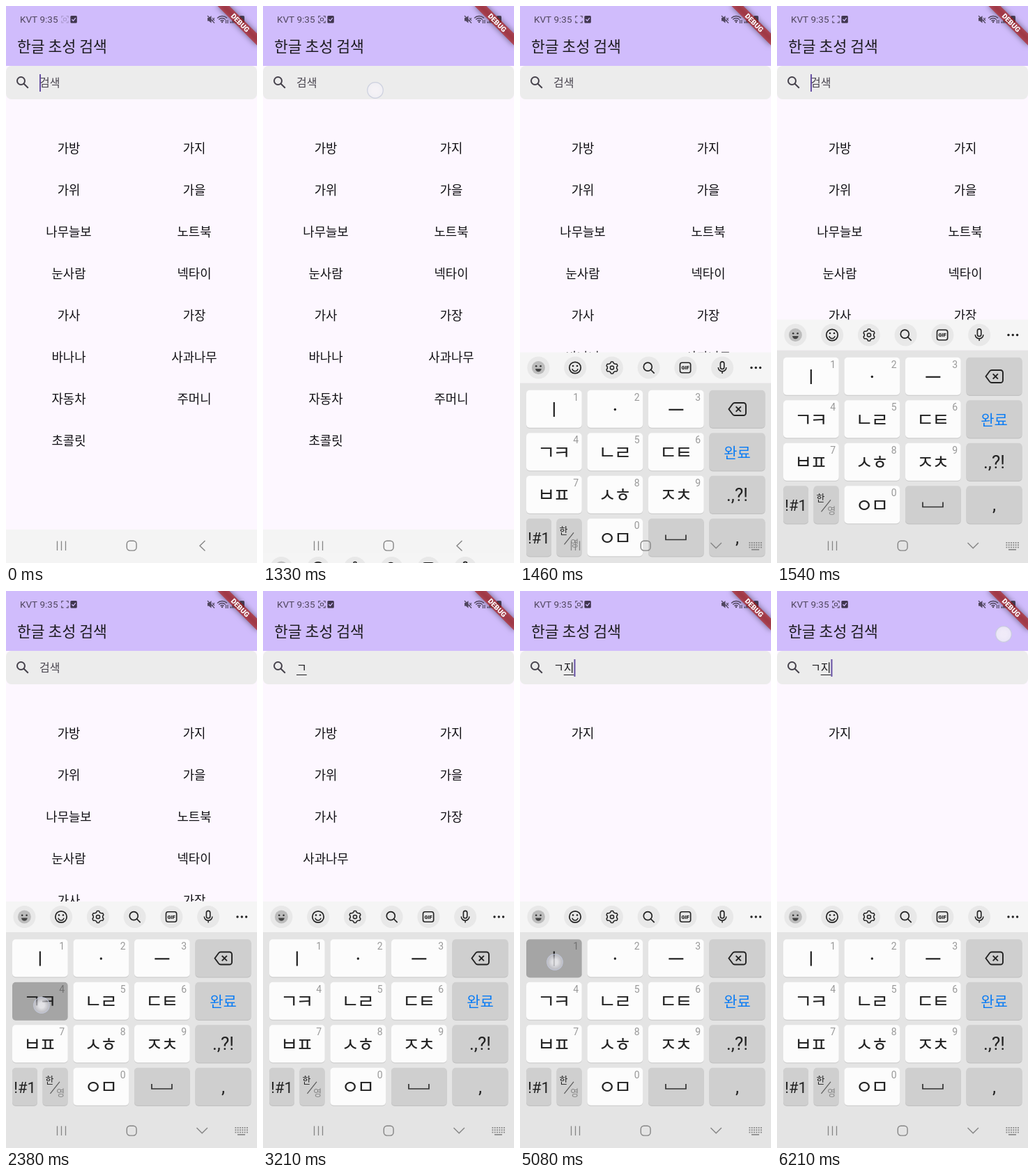
An HTML page with a canvas that plays this animation: 360 px wide and 800 px high, repeating every 6290 ms.

```html
<!DOCTYPE html>
<html lang="ko">
<head>
<meta charset="utf-8">
<title>한글 초성 검색</title>
<style>
html, body { margin: 0; width: 100%; height: 100%; overflow: hidden; background: #fdf7ff; }
canvas { display: block; width: 360px; height: 800px; }
</style>
</head>
<body>
<canvas id="stage"></canvas>
<script>
const LOOP = 6290;
const KR = '"Noto Sans CJK KR", "Noto Sans CJK", sans-serif';
const LATIN = 'Roboto, sans-serif';
const INK = '#1c1b1f', STATUS = '#50465f', NAV = '#858585';
const WORDS = '가방 가지 가위 가을 나무늘보 노트북 눈사람 넥타이 가사 가장 바나나 사과나무 자동차 주머니 초콜릿'.split(' ');
const INITIALS = 'ㄱㄲㄴㄷㄸㄹㅁㅂㅃㅅㅆㅇㅈㅉㅊㅋㅌㅍㅎ';
const FIELD_X = 48, FIELD_ADVANCE = 14.72;

// [start time, value] steps
const QUERY = [[0, ''], [2460, 'ㄱ'], [3830, 'ㄱㅈ'], [5080, 'ㄱ지']];
const DROP = [[0, 400], [1330, 339], [1380, 238], [1420, 125], [1460, 51.5], [1500, 18], [1540, 4.5], [1590, 1], [1630, 0]];
const CURSOR = [[0, 1], [540, 0], [1040, 1], [1250, 0], [1540, 1], [2040, 0], [2460, 1], [2960, 0],
  [3500, 1], [4330, 0], [4830, 1], [5580, 0], [6080, 1]];
const TAPS = [
  { from: 1210, hold: 1330, to: 1400, x: 161, y: 121 },
  { from: 2380, hold: 2500, to: 2630, x: 51, y: 595, key: 'ㄱㅋ' },
  { from: 3670, hold: 3830, to: 3960, x: 224, y: 657, key: 'ㅈㅊ' },
  { from: 4960, hold: 5080, to: 5210, x: 50, y: 533, key: 'ㅣ' },
  { from: 6210, hold: 6400, to: 6500, x: 325, y: 62 }
];

const canvas = document.getElementById('stage');
const ratio = window.devicePixelRatio || 1;
canvas.width = 360 * ratio;
canvas.height = 800 * ratio;
const c = canvas.getContext('2d');

const clamp = v => Math.max(0, Math.min(1, v));
const stepAt = (steps, t) => steps.filter(s => s[0] <= t).pop()[1];
const tapAlpha = (tap, t) => t < tap.from ? 0 : clamp((tap.to - t) / (tap.to - tap.hold));

function rect(x, y, w, h, color) {
  c.fillStyle = color;
  c.fillRect(x, y, w, h);
}
function box(x, y, w, h, r) {
  c.beginPath();
  c.roundRect(x, y, w, h, r);
}
function fillBox(x, y, w, h, r, color) {
  box(x, y, w, h, r);
  c.fillStyle = color;
  c.fill();
}
function disc(x, y, r, color) {
  c.beginPath();
  c.arc(x, y, r, 0, 7);
  c.fillStyle = color;
  c.fill();
}
function stroke(color, width) {
  c.strokeStyle = color;
  c.lineWidth = width;
  c.stroke();
}
function ring(x, y, r, color, width) {
  c.beginPath();
  c.arc(x, y, r, 0, 7);
  stroke(color, width);
}
function line(color, width, ...points) {
  c.beginPath();
  for (let i = 0; i < points.length; i += 2) c.lineTo(points[i], points[i + 1]);
  stroke(color, width);
}
function text(s, x, y, size, color, { font = KR, align = 'left', weight = 400, spacing = 0 } = {}) {
  c.font = `${weight} ${size}px ${font}`;
  c.letterSpacing = `${spacing}px`;
  c.textAlign = align;
  c.fillStyle = color;
  c.fillText(s, x, y);
}

function matches(word, query) {
  const fits = (a, b) => a === b || INITIALS[Math.floor((a.charCodeAt(0) - 0xac00) / 588)] === b;
  return [...word].some((_, i) => [...query].every((q, j) => word[i + j] && fits(word[i + j], q)));
}

function magnifier(x, y, r, reach, color, width) {
  ring(x, y, r, color, width);
  const d = r * 0.72;
  line(color, width, x + d, y + d, x + reach, y + reach);
}

function drawStatus(t) {
  text('KVT', 20, 24, 13.5, STATUS, { font: LATIN });
  text('9:35', 48.5, 24, 13.5, STATUS, { font: LATIN });

  c.globalAlpha = t < 210 ? 0.3 + 0.7 * t / 210 : 1;
  for (const sx of [-1, 1]) for (const sy of [-1, 1]) {
    const x = 84.5 + sx * 4.7, y = 19.2 + sy * 4.7;
    line(STATUS, 1.1, x - sx * 2.7, y, x, y, x, y - sy * 2.7);
  }
  if (Math.floor((t + 120) / 500) % 2 === 0) {
    box(82.5, 17.2, 4, 4, 1);
    stroke(STATUS, 1.1);
  }
  c.globalAlpha = 1;

  fillBox(92.4, 14, 9.4, 10.4, 1.5, '#40364f');
  line('#d0bcfc', 1.3, 94.5, 19.2, 96.5, 21.3, 99.8, 17.2);

  c.beginPath();
  [[289, 17], [291, 17], [294.5, 14], [294.5, 24.5], [291, 21.5], [289, 21.5]].forEach(p => c.lineTo(...p));
  c.fillStyle = STATUS;
  c.fill();
  line(STATUS, 1.2, 289, 14, 299, 24.5);
  line(STATUS, 1.1, 296, 17, 299, 21);
  line(STATUS, 1.1, 299, 17, 296, 21);
  for (const r of [3.5, 6.5, 9.5]) {
    c.beginPath();
    c.arc(310, 24, r, -Math.PI * 0.76, -Math.PI * 0.24);
    stroke(STATUS, 1.3);
  }
  disc(310, 23, 1.2, STATUS);
  line(STATUS, 1.2, 315.5, 20, 315.5, 25);
  line(STATUS, 1.2, 318, 20, 318, 25);
  [2, 4.5, 7, 10].forEach((h, i) => rect(321.5 + i * 3, 24.5 - h, 2, h, STATUS));
  fillBox(335, 14, 7, 11, 1.5, STATUS);
}

function drawBanner() {
  c.save();
  c.translate(360, 0);
  c.rotate(Math.PI / 4);
  c.save();
  c.shadowColor = 'rgba(0,0,0,.5)';
  c.shadowBlur = 8 * ratio;
  c.shadowOffsetX = 1000 * ratio;
  const away = 1000 / Math.SQRT2;
  rect(-40 - away, 28 + away, 80, 12, '#000');
  c.restore();
  rect(-40, 28, 80, 12, 'rgba(183,28,28,.63)');
  text('DEBUG', 0, 37.6, 10.2, '#fff', { font: LATIN, align: 'center', weight: 900 });
  c.restore();
}

function drawApp(t) {
  const query = stepAt(QUERY, t);
  rect(0, 0, 360, 800, '#fdf7ff');
  rect(0, 0, 360, 86, '#d0bcfc');
  drawStatus(t);
  text('한글 초성 검색', 16, 65.5, 21.6, INK);

  fillBox(0, 86, 360, 48, 8, '#ececec');
  magnifier(21.5, 107.5, 5.5, 10.3, '#45414b', 2);
  [...(query || '검색')].forEach((ch, i) =>
    text(ch, FIELD_X + i * FIELD_ADVANCE, 116, 16, query ? INK : '#49454f'));
  const end = FIELD_X + query.length * FIELD_ADVANCE;
  if (query) rect(end - FIELD_ADVANCE, 120, FIELD_ADVANCE, 1, INK);
  if (stepAt(CURSOR, t)) rect(end, 98, 2, 25, '#6750a4');

  WORDS.filter(w => !query || matches(w, query)).forEach((word, i) =>
    text(word, 90 + i % 2 * 180, 211 + Math.floor(i / 2) * 60, 17.8, '#111014', { align: 'center' }));
  rect(0, 752, 360, 48, '#f4f4f4');
}

function drawToolbar() {
  const y = 468, dark = '#222';
  rect(0, 446, 360, 44, '#f5f5f5');
  for (let i = 0; i < 6; i++) disc(26.4 + i * 52.75, y, 16, '#e8e8e8');

  disc(26.4, y, 9.5, '#bcbcbc');
  disc(23.2, y - 2.2, 1.3, '#333');
  disc(29.6, y - 2.2, 1.3, '#333');
  c.beginPath();
  c.arc(26.4, y + 1.4, 4.3, 0, Math.PI);
  c.fillStyle = '#444';
  c.fill();

  ring(79, y, 8.2, dark, 1.7);
  disc(76, y - 2.5, 1.3, dark);
  disc(82, y - 2.5, 1.3, dark);
  c.beginPath();
  c.arc(79, y + 0.8, 4.2, 0.2, Math.PI - 0.2);
  stroke(dark, 1.5);

  c.beginPath();
  for (let i = 0; i < 64; i++) {
    const a = i / 64 * Math.PI * 2, r = 7.6 + 0.9 * Math.tanh(3 * Math.cos(6 * a + Math.PI));
    c.lineTo(132 + r * Math.cos(a), y + r * Math.sin(a));
  }
  c.closePath();
  stroke(dark, 1.5);
  ring(132, y, 2.6, dark, 1.5);

  magnifier(183.3, y - 1.3, 6, 9.4, dark, 1.7);

  box(229.5, y - 7.3, 15.2, 14.6, 3);
  stroke(dark, 1.6);
  text('GIF', 237.1, y + 2.6, 7.3, dark, { font: LATIN, align: 'center', weight: 900 });

  box(287.4, y - 8.6, 5.4, 10.6, 2.7);
  stroke(dark, 1.6);
  c.beginPath();
  c.arc(290.1, y - 0.5, 5.8, 0, Math.PI);
  stroke(dark, 1.5);
  line(dark, 1.5, 290.1, y + 5.3, 290.1, y + 8.6);

  for (const x of [332, 338.3, 344.6]) disc(x, y, 1.7, dark);
}

function drawKey(label, x, y, w, { digit, gray, press = 0 } = {}) {
  const cx = x + w / 2, cy = y + 27.2;
  fillBox(x, y + 1, w, 54.2, 5, gray ? '#c2c2c2' : '#cfcfcf');
  fillBox(x, y, w, 54, 5, gray ? '#cfcfcf' : '#fcfcfc');
  if (press) {
    c.globalAlpha = press;
    fillBox(x, y, w, 55, 5, '#a5a5a5');
    c.globalAlpha = 1;
  }
  if (digit) text(digit, x + w - 4.5, y + 15, 14, press ? '#707070' : '#999', { font: LATIN, align: 'right' });
  const latin = size => text(label, cx, y + 36, size, '#222', { font: LATIN, align: 'center' });
  switch (label) {
    case 'ㅣ': return rect(cx - 1.1, cy - 10, 2.2, 21, '#222');
    case 'ㆍ': return disc(cx, cy + 0.5, 1.7, '#222');
    case 'ㅡ': return rect(cx - 10.5, cy - 0.3, 21, 2.2, '#222');
    case '완료': return text(label, cx, cy + 8, 21, '#0b7cf4', { align: 'center' });
    case '!#1': return latin(22);
    case '.,?!': return latin(26);
    case ',': return latin(26);
    case 'space': return line('#333', 1.7, 209, cy - 4, 209, cy + 3, 238, cy + 3, 238, cy - 4);
    case 'lang':
      text('한', 62.5, y + 22, 13, '#222', { align: 'center' });
      text('영', 78.3, y + 40, 13, '#858585', { align: 'center' });
      return line('#555', 1.1, 63.5, y + 37, 77, y + 20);
    case 'erase':
      c.beginPath();
      c.moveTo(299.5, cy);
      c.lineTo(305, cy - 7.5);
      c.quadraticCurveTo(306.2, cy - 9, 308, cy - 9);
      c.arcTo(324, cy - 9, 324, cy, 3.5);
      c.arcTo(324, cy + 9, 308, cy + 9, 3.5);
      c.lineTo(308, cy + 9);
      c.quadraticCurveTo(306.2, cy + 9, 305, cy + 7.5);
      c.closePath();
      stroke('#222', 1.9);
      line('#222', 1.9, 309.7, cy - 3.6, 316.9, cy + 3.6);
      return line('#222', 1.9, 316.9, cy - 3.6, 309.7, cy + 3.6);
    default: text(label, cx - 1.5, cy + 10.3, 27.5, '#222', { align: 'center', weight: 500, spacing: -3 });
  }
}

function drawKeyboard(t) {
  const drop = stepAt(DROP, t);
  if (drop > 354) return;
  c.save();
  c.translate(0, drop);
  drawToolbar();
  rect(0, 490, 360, 310, '#e4e4e4');
  const press = label => {
    const tap = TAPS.find(p => p.key === label);
    return tap ? tapAlpha(tap, t) : 0;
  };
  const colX = i => 9 + i * 87.5, rowY = i => 500.3 + i * 61.5;
  ['ㅣ', 'ㆍ', 'ㅡ', 'ㄱㅋ', 'ㄴㄹ', 'ㄷㅌ', 'ㅂㅍ', 'ㅅㅎ', 'ㅈㅊ'].forEach((label, i) =>
    drawKey(label, colX(i % 3), rowY(Math.floor(i / 3)), 79.7, { digit: String(i + 1), press: press(label) }));
  ['erase', '완료', '.,?!', ','].forEach((label, i) => drawKey(label, colX(3), rowY(i), 80, { gray: true }));
  drawKey('!#1', 9, rowY(3), 36, { gray: true });
  drawKey('lang', 52.5, rowY(3), 36, { gray: true });
  drawKey('ㅇㅁ', colX(1), rowY(3), 79.7, { digit: '0' });
  drawKey('space', colX(2), rowY(3), 79.7, { gray: true });
  c.restore();
}

function drawNav(t) {
  for (const x of [73.5, 79.5, 85.5]) line(NAV, 1.3, x, 768.5, x, 782);
  box(173.3, 768.3, 13.8, 13.8, 4.5);
  stroke(NAV, 1.4);
  if (t < 1380) return line(NAV, 1.4, 285.5, 768, 278, 775.3, 285.5, 782.5);
  line(NAV, 1.4, 273.5, 771, 281.2, 778.7, 289, 771);
  for (let row = 0; row < 3; row++)
    for (let i = 0; i < 6; i++) rect(328.5 + i * 3.3, 770 + row * 3.3, 1.8, 1.8, NAV);
  rect(332, 780, 11, 1.6, NAV);
}

function drawTaps(t) {
  for (const tap of TAPS) {
    c.globalAlpha = tapAlpha(tap, t);
    if (!c.globalAlpha) continue;
    const glow = c.createRadialGradient(tap.x, tap.y, 4, tap.x, tap.y, 12);
    glow.addColorStop(0, tap.key ? 'rgba(250,250,255,.72)' : 'rgba(246,243,248,.85)');
    glow.addColorStop(1, tap.key ? 'rgba(225,225,240,.3)' : 'rgba(240,239,245,.8)');
    disc(tap.x, tap.y, 11.5, glow);
    ring(tap.x, tap.y, 11.3, 'rgba(195,200,218,.8)', 1.2);
  }
  c.globalAlpha = 1;
}

function draw(now) {
  const t = now % LOOP;
  c.setTransform(ratio, 0, 0, ratio, 0, 0);
  drawApp(t);
  drawKeyboard(t);
  drawNav(t);
  drawBanner();
  drawTaps(t);
}

const start = performance.now();
function frame() {
  draw(performance.now() - start);
  requestAnimationFrame(frame);
}
frame();
</script>
</body>
</html>
```
